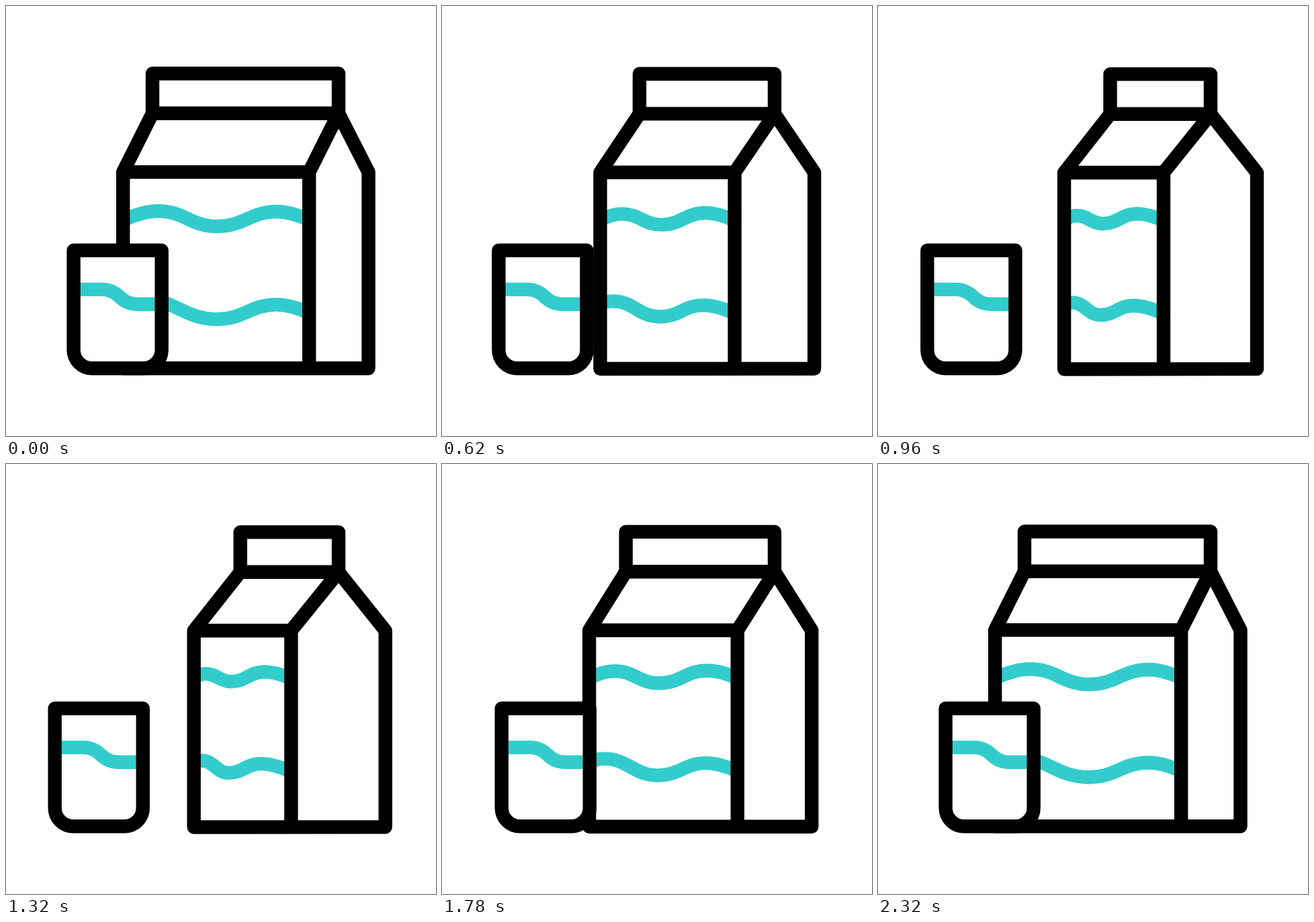
Write an HTML page with a canvas that moves like this. It is 640 by 640 pixels and loops after 2.4 s.

```html
<!DOCTYPE html>
<html lang="en">
<head>
<meta charset="utf-8">
<title>Milk carton and glass</title>
<style>
  html, body { margin: 0; width: 100%; height: 100%; overflow: hidden; background: #fff; }
  canvas { display: block; width: 100%; height: 100%; }
</style>
</head>
<body>
<canvas id="stage" width="640" height="640"></canvas>
<script>
const ctx = document.getElementById('stage').getContext('2d');
const LOOP = 2400, STEP = 20;
const INK = '#000', MILK = '#33cccc';

const clamp = v => Math.min(1, Math.max(0, v));

// Cubic ease with handles at (2/3, 0) and (1/3, 1), solved by bisection.
function ease(x) {
  let low = 0, high = 1;
  for (let i = 0; i < 30; i++) {
    const u = (low + high) / 2;
    if (2 * u - 3 * u * u + 2 * u * u * u < x) low = u; else high = u;
  }
  return low * low * (3 - 2 * low);
}

function progress(t) {
  return t < 1190 ? ease(clamp(t / 1180)) : 1 - ease(clamp((t - 1204) / 1094));
}

function line(points, closed) {
  ctx.beginPath();
  points.forEach(([x, y]) => ctx.lineTo(x, y));
  if (closed) ctx.closePath();
  ctx.stroke();
}

// Runs from the left edge over a crest, a trough and a second crest to the right edge.
function wave([start, crest, trough, crest2, end]) {
  const swing = (a, b) => {
    const reach = 0.45 * (b[0] - a[0]);
    ctx.bezierCurveTo(a[0] + reach, a[1], b[0] - reach, b[1], b[0], b[1]);
  };
  ctx.beginPath();
  ctx.moveTo(...start);
  ctx.quadraticCurveTo(crest[0] + 0.42 * (start[0] - crest[0]), crest[1], ...crest);
  swing(crest, trough);
  swing(trough, crest2);
  ctx.quadraticCurveTo(crest2[0] + 0.42 * (end[0] - crest2[0]), crest2[1], ...end);
  ctx.stroke();
}

function drawCarton(p) {
  const at = (x, y, dx, dy) => [x + dx * p, y + dy * p];
  const left = 174.2 + 106.5 * p, edge = 451.2 - 27.1 * p, right = 539.5 + 25.4 * p;
  const ridge = 218 + 132 * p, apex = 495;
  const top = 100.5 + 0.9 * p, fold = 159.8 + p;
  const shoulder = 247.1 + 0.9 * p, base = 539.3 + 1.2 * p;

  ctx.strokeStyle = MILK;
  wave([[left, 319 - p], at(226, 305.3, 72, 7), at(314.5, 328, 20.7, -4.2),
        at(403, 306, -18.5, 3.4), [edge, 318.5 + p]]);
  wave([[left, 444 - 2 * p], at(203, 436.5, 89, 5), at(314.5, 466.2, 17, -6.5),
        at(403, 444.5, -24, 1.6), [edge, 457 + p]]);

  ctx.strokeStyle = INK;
  line([[ridge, top], [apex, top], [apex, fold], [ridge, fold]], true);
  line([[ridge, fold], [left, shoulder], [left, base], [right, base - 0.3 * p],
        [right, shoulder], [apex, fold]]);
  line([[left, shoulder], [edge, shoulder]]);
  line([[apex, fold], [edge, shoulder], [edge, base]]);
}

function drawGlass(p) {
  ctx.save();
  ctx.translate(-28.2 * p, 0);

  ctx.beginPath();
  ctx.moveTo(100.6, 363.7);
  ctx.lineTo(231.7, 363.7);
  ctx.arcTo(231.7, 539.3, 128, 539.3, 27.2);
  ctx.arcTo(100.6, 539.3, 100.6, 363.7, 27.2);
  ctx.closePath();
  const body = new Path2D();
  body.moveTo(100.6, 363.7);
  body.lineTo(231.7, 363.7);
  body.arcTo(231.7, 539.3, 128, 539.3, 27.2);
  body.arcTo(100.6, 539.3, 100.6, 363.7, 27.2);
  body.closePath();
  ctx.fillStyle = '#fff';
  ctx.fill(body);

  ctx.strokeStyle = MILK;
  ctx.beginPath();
  ctx.moveTo(101, 421.9);
  ctx.lineTo(143, 421.9);
  ctx.bezierCurveTo(153, 421.9, 162, 425.8, 169, 432.8);
  ctx.bezierCurveTo(176, 439.8, 185, 443.8, 195, 443.8);
  ctx.lineTo(231, 443.8);
  ctx.stroke();

  ctx.strokeStyle = INK;
  ctx.stroke(body);
  ctx.restore();
}

function draw(now) {
  const t = Math.floor((now % LOOP) / STEP) * STEP;
  const p = progress(t);
  ctx.fillStyle = '#fff';
  ctx.fillRect(0, 0, 640, 640);
  ctx.lineWidth = 20.4;
  ctx.lineJoin = 'round';
  drawCarton(p);
  drawGlass(p);
}

let begin;
function tick(now) {
  begin ??= now;
  draw(now - begin);
  requestAnimationFrame(tick);
}
draw(0);
requestAnimationFrame(tick);
</script>
</body>
</html>
```
